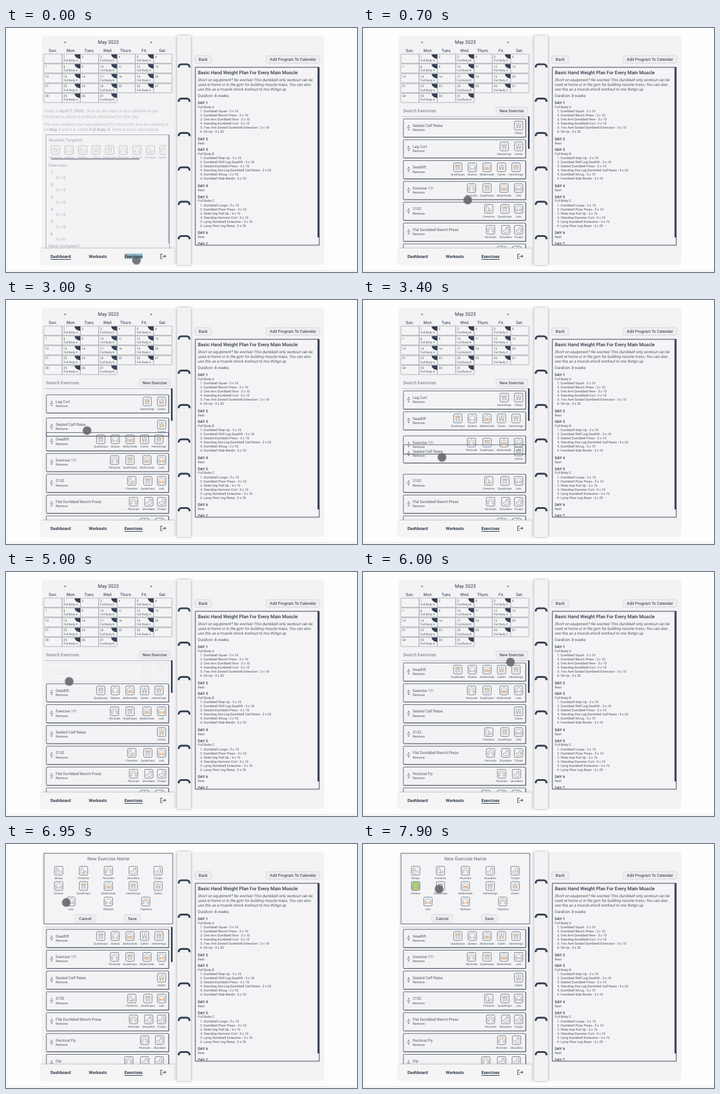
An HTML page that plays this animation: 600 by 417 pixels, repeating every 8000 ms.

```html
<!DOCTYPE html>
<html lang="en">
<head>
<meta charset="utf-8">
<title>Workout binder</title>
<style>
html, body { margin: 0; width: 100%; height: 100%; overflow: hidden; background: #fdfdfd; }
svg { display: block; font-family: Roboto, sans-serif; fill: #4c525c; text-rendering: geometricPrecision; }
.line { fill: none; stroke: #4a5463; }
.mid { text-anchor: middle; }
.med { font-weight: 500; }
.it { font-style: italic; }
.dark { fill: #2c3646; }
.soft { filter: drop-shadow(0 .7px 1px #0004); }
</style>
</head>
<body>
<svg id="stage" width="600" height="417" viewBox="0 0 600 417"></svg>
<script>
const LOOP = 8000, PITCH = 35.6;
const $ = id => document.getElementById(id);
const set = (id, attrs) => {
  for (const k in attrs) $(id).setAttribute(k, attrs[k]);
};
const range = (n, f) => Array.from({ length: n }, (_, i) => f(i)).join('');
const text = (x, y, s, size, cls = '', more = '') =>
  `<text x="${x}" y="${y}" font-size="${size}" class="${cls}" ${more}>${s}</text>`;
const rect = (x, y, w, h, more = '') =>
  `<rect x="${x}" y="${y}" width="${w}" height="${h}" ${more}/>`;
const path = (d, more = '') => `<path d="${d}" ${more}/>`;
const group = (id, body, more = '') => `<g id="${id}" ${more}>${body}</g>`;
const button = (x, y, w, label) =>
  rect(x, y, w, 11.5, 'rx="1.5" fill="#eeeef0" class="soft"') +
  text(x + w / 2, y + 8.2, label, 6.95, 'mid med');

// Muscle icons: a grey outline plus an orange highlight
const LEGS = 'M-3.6-5Q-4.4-2-3.2 0-3.8 2.5-2.8 5M-.6-5Q-.5-2-1.3 0-.9 2.5-1.5 5' +
  'M3.6-5Q4.4-2 3.2 0 3.8 2.5 2.8 5M.6-5Q.5-2 1.3 0 .9 2.5 1.5 5';
const TORSO = 'M-5 5V0Q-5-3.5-2-4L0-5 2-4Q5-3.5 5 0V5M-3 0V5M3 0V5';
const ARM = 'M-4-5Q-5.5 2-4 4.5H2Q5 4 4.5 1 2-1 0 1.5L-1-4Z';
const MUSCLES = {
  Biceps: [ARM, 'M-2.5-2V1.5'], Forearms: [ARM, 'M-2 3H2.5'],
  Shoulders: [ARM, 'M-2.5-4V-1.5', -1], Triceps: [ARM, 'M-3.5-1V2.5', -1],
  Pectorals: [TORSO, 'M-2.5-1H-.5M.5-1H2.5'], Abdominals: [TORSO, 'M-.9-1V4.5M.9-1V4.5'],
  Lats: [TORSO, 'M-2 0L-1.2 3.5M2 0L1.2 3.5'], Obliques: [TORSO, 'M-2.2 1V4M2.2 1V4'],
  Trapezius: [TORSO, 'M-2.5-2.5L0-.5 2.5-2.5'], Gluteus: [TORSO, 'M-2 3H-.4M.4 3H2'],
  Quadriceps: [LEGS, 'M-2.3-4V-1M2.3-4V-1'], Hamstrings: [LEGS, 'M-2.3-2.5V.5M2.3-2.5V.5'],
  Calves: [LEGS, 'M-2.3 .5V3M2.3 .5V3']
};
const icon = (x, y, name) => {
  const [shape, spot, flip = 1] = MUSCLES[name];
  return `<g transform="translate(${x} ${y})">` +
    rect(-7.2, -7.5, 14.4, 15, 'rx="2.2" class="line" stroke-width=".75"') +
    `<g transform="scale(${flip} 1)" fill="none">` +
    path(shape, 'stroke="#8b9199" stroke-width=".7"') +
    path(spot, 'stroke="#eca86a" stroke-width="1.4"') + '</g>' +
    text(0, 14.4, name, 4.85, 'mid it') + '</g>';
};

// Calendar
const colX = c => 65 + c * 31.3, rowY = r => 45 + r * 16.75;
const dayCell = day => {
  const c = day % 7, r = Math.floor(day / 7), x = colX(c), y = rowY(r);
  const plan = { 1: 'A', 3: 'B', 5: 'C' }[c];
  return rect(x, y, 30.8, 15, 'fill="#f4f4f6" stroke="#a3a7ad" stroke-width=".5" class="soft"') +
    (day ? text(x + 2, y + 6, day, 5.2) : '') +
    (plan ? path(`M${x + 21} ${y}H${x + 30.8}V${y + 7.6}A9.8 7.6 0 0 1 ${x + 21} ${y}Z`, 'fill="#354054"') +
      text(x + 2.2, y + 12.3, 'Full Body ' + plan, 4.9) : '');
};
const calendar =
  text(101, 26.5, '&lt;', 8, 'mid dark') + text(175, 27, 'May 2023', 8.2, 'mid dark') +
  text(248, 26.5, '&gt;', 8, 'mid dark') +
  ['Sun.', 'Mon.', 'Tues.', 'Wed.', 'Thurs.', 'Fri.', 'Sat.']
    .map((d, i) => text(80 + i * 31.3, 41, d, 7.2, 'mid dark')).join('') +
  range(32, dayCell);

// Dashboard page
const bold = s => `<tspan font-weight="600">${s}</tspan>`;
const dashboard =
  `<g opacity=".75">` +
  text(64, 144, `Today is ${bold('April 3, 2020')}. Click on any date on the calendar to get`, 7.12) +
  text(64, 153.5, 'information about a workout scheduled for that day.', 7.12) +
  text(64, 166.5, 'The next workout you have planned for the month you are viewing is', 7.12) +
  text(64, 176, `on ${bold('May 1')} and it is called ${bold('Full Body A')}. Here is more information.`, 7.12) +
  '</g>' + rect(68.5, 182.5, 211, 200, 'class="line"') + rect(277.5, 183, 2.5, 185, 'fill="#354054"') +
  text(73, 194, 'Muscles Targeted', 7.3) +
  '<svg x="73" y="198" width="201" height="25">' +
  ['Hamstrings', 'Gluteus', 'Biceps', 'Calves', 'Quadriceps', 'Pectorals', 'Obliques', 'Forearms', 'Trapezius']
    .map((m, i) => icon(11.5 + i * 23.2, 10.5, m)).join('') + '</svg>' +
  rect(77, 222.5, 151, 2.6, 'fill="#354054"') +
  text(73, 236.5, 'Exercises', 7.3) +
  range(6, i => text(76, 249 + i * 21, i + 1 + '.', 6.5, 'med') +
    text(85, 258 + i * 21, i < 5 ? '3 x 10' : '3 x 20', 6.3)) +
  text(73, 375, 'Mark Complete?', 7.3);

// Exercise list
const EXERCISES = [
  ['Seated Calf Raise', 'Calves 266'],
  ['Leg Curl', 'Hamstrings 241.5 Calves 266'],
  ['Deadlift', 'Quadriceps 162 Gluteus 186.8 Abdominals 212 Calves 236.8 Hamstrings 261.5'],
  ['Exercise 11!', 'Pectorals 185.5 Quadriceps 212 Abdominals 241 Lats 266'],
  ['2132', 'Forearms 215 Quadriceps 242.5 Lats 266'],
  ['Flat Dumbbell Bench Press', 'Pectorals 218 Shoulders 244 Triceps 266'],
  ['Pectoral Fly', 'Pectorals 237 Shoulders 262.5'],
  ['Dip', 'Pectorals 210 Shoulders 237 Triceps 262']
];
const card = ([name, muscles], i) => group('card' + i,
  rect(69, 1.1, 209, 31, 'rx="1" class="line" stroke-width=".9"') +
  path('M69.5 32.6H278.5V1.6', 'class="line" stroke-width="1.1" opacity=".65"') +
  path('M75.3 16H80.7M78 12V14.3M78 17.7V20M76.7 13.3L78 12 79.3 13.3M76.7 18.7L78 20 79.3 18.7', 'class="line" stroke-width=".8"') +
  text(85, 14.8, name, 6.55) + text(85, 22, 'Remove', 5.7) +
  muscles.replace(/(\w+) ([\d.]+)/g, (_, m, x) => icon(+x, 12.5, m)));
const exercises =
  group('search', text(68.5, 144, 'Search Exercises', 7.5, '', 'opacity=".8"') + button(228, 135.7, 52.5, 'New Exercise')) +
  `<svg id="list" x="0" width="290">${path('M66 .5H285', 'stroke="#9aa0a8" stroke-width=".7"')}` +
  EXERCISES.map(card).join('') + rect(282, 0, 2.8, 50, 'id="bar" fill="#354054"') + '</svg>';

// New exercise form
const iconRow = (x, dx, y, names) => names.split(' ').map((m, i) => icon(x + i * dx, y, m)).join('');
const form =
  rect(65, 128, 220, 120.5, 'fill="#f4f4f6" stroke="#4a5463" stroke-width=".9"') +
  text(175, 140.3, 'New Exercise Name', 8.15, 'mid', 'opacity=".85"') +
  rect(82.8, 176.2, 14.4, 15, 'id="picked" rx="2.2" fill="#b2d681"') +
  iconRow(90, 42.5, 157.7, 'Biceps Forearms Pectorals Shoulders Triceps') +
  iconRow(90, 42.5, 183.7, 'Gluteus Quadriceps Abdominals Hamstrings Calves') +
  iconRow(111, 64, 210.3, 'Lats Obliques Trapezius') +
  button(118, 233.3, 35, 'Cancel') + button(203, 233.3, 26, 'Save');

// Navigation
const nav =
  path('M61 377H288V405H66Q61 405 61 400Z', 'fill="#f5f5f6" style="filter:drop-shadow(0 -1px 1.5px #0003)"') +
  rect(203, 385.5, 30.5, 9, 'id="mark" fill="#8fb7c9"') +
  [['Dashboard', 93.3], ['Workouts', 157], ['Exercises', 218]]
    .map(([s, x]) => text(x, 392.6, s, 7.2, 'mid dark', 'font-weight="600"')).join('') +
  rect(76, 395, 35, 1, 'id="under" class="dark"') +
  path('M268 386.5H264.5V394H268M267 390.2H273M270.8 388L273 390.2 270.8 392.4', 'class="line" stroke-width="1.1"');

// Binder spine
const spine =
  rect(292.5, 13, 23.5, 392, 'rx="1.5" fill="#f2f2f4" style="filter:drop-shadow(0 0 2px #0005)"') +
  range(6, i => `<g transform="translate(0 ${62 + i * 58.7})">` +
    path('M295 5.5Q295.5 0 300 0H309Q313.5 0 314 5.5', 'fill="none" stroke="#354054" stroke-width="3.2"') + '</g>');

// Program page
const PROGRAM = [
  ['Full Body A', 'Dumbbell Squat - 3 x 10', 'Dumbbell Bench Press - 3 x 10', 'One Arm Dumbbell Row - 3 x 10',
    'Standing Dumbbell Curl - 3 x 10', 'Two Arm Seated Dumbbell Extension - 3 x 10', 'Sit Up - 3 x 20'],
  ['Rest'],
  ['Full Body B', 'Dumbbell Step Up - 3 x 10', 'Dumbbell Stiff Leg Deadlift - 3 x 10', 'Seated Dumbbell Press - 3 x 10',
    'Standing One Leg Dumbbell Calf Raise - 3 x 20', 'Dumbbell Shrug - 3 x 10', 'Dumbbell Side Bends - 3 x 10'],
  ['Rest'],
  ['Full Body C', 'Dumbbell Lunge - 3 x 10', 'Dumbbell Floor Press - 3 x 10', 'Wide Grip Pull Up - 3 x 10',
    'Standing Hammer Curl - 3 x 10', 'Lying Dumbbell Extension - 3 x 10', 'Lying Floor Leg Raise - 3 x 20'],
  ['Rest'], []
];
let dayY = 130.3;
const days = PROGRAM.map(([kind, ...moves], i) => {
  const y = dayY;
  dayY += moves.length ? 61.3 : 18.8;
  return text(328, y, 'DAY ' + (i + 1), 6.4, 'med dark') + (kind ? text(328, y + 6.9, kind, 5.65) : '') +
    moves.map((m, j) => text(332, y + 14 + j * 7, `${j + 1}. ${m}`, 5.64)).join('');
}).join('');
const program =
  button(323.5, 48, 27, 'Back') + button(445.5, 48, 90, 'Add Program To Calendar') +
  rect(323.8, 67.3, 211.5, 303.7, 'fill="#f4f4f6" stroke="#4a5463" class="soft"') +
  rect(532.5, 67, 3, 291, 'fill="#354054"') +
  text(328, 79.3, 'Basic Hand Weight Plan For Every Main Muscle', 8.1, 'med dark') +
  ['Short on equipment? No worries! This dumbbell only workout can be',
    'used at home or in the gym for building muscle mass. You can also',
    'use this as a muscle shock workout to mix things up.']
    .map((s, i) => text(328, 91.3 + i * 7.9, s, 6.69, 'it')).join('') +
  text(328, 118, 'Duration: 8 weeks', 6.7) +
  `<svg width="600" height="370">${days}</svg>`;

$('stage').innerHTML =
  rect(0, 0, 600, 417, 'fill="#fdfdfd"') + rect(0, 414.5, 600, 1, 'fill="#dedede"') +
  rect(2, 0, .7, 414, 'fill="#ececec"') +
  rect(61, 13.5, 483, 391.5, 'rx="5" fill="#f3f3f5"') +
  group('calendar', calendar) + group('dashboard', dashboard) +
  group('exercises', exercises) + group('form', form) + nav + program + spine +
  group('cursor', '<circle r="8" fill="#55565c" opacity=".3"/><circle r="7" fill="#606168" opacity=".8"/>');

// Motion
const clamp = v => Math.min(1, Math.max(0, v));
const ramp = (t, start, length) => clamp((t - start) / length);
const slide = (t, start) => 1 - (1 - ramp(t, start, 300)) ** 2;
const PATH = [
  [0, 223, 397], [150, 222, 393], [700, 179, 294], [1000, 177, 285], [1700, 158, 205], [2350, 142, 177],
  [2600, 142, 177], [3400, 135, 269], [3650, 134, 283], [4150, 134, 283], [4650, 98, 176], [4800, 98, 177],
  [5000, 108, 187], [5750, 252, 156], [6000, 252, 154], [6180, 254, 142], [6300, 252, 142],
  [6700, 109, 112], [7350, 91, 76], [7650, 92, 76], [7850, 130, 77], [8000, 130, 77]
];
const cursorAt = t => {
  const i = Math.max(1, PATH.findIndex(p => p[0] > t));
  const [a, b] = [PATH[i - 1], PATH[i]];
  let k = (t - a[0]) / (b[0] - a[0]);
  k = k * k * (3 - 2 * k);
  return [a[1] + (b[1] - a[1]) * k, a[2] + (b[2] - a[2]) * k];
};

const DROP = 3700, REMOVED = 5050, OPEN = 6300, RAISE = 6850;
const PASSED = { 1: 2830, 2: 3040, 3: 3220 };

function slotOf(i, t) {
  const gone = i === 1 ? 0 : slide(t, REMOVED);
  if (i) return i - (PASSED[i] ? slide(t, PASSED[i]) : 0) - gone;
  const pulled = t < 2600 ? 0 : (cursorAt(Math.min(t, DROP))[1] - 177) / PITCH;
  return pulled + (3 - pulled) * slide(t, DROP) - gone;
}

function draw(t) {
  const [x, y] = cursorAt(t), open = t >= OPEN, raised = t >= RAISE;
  set('cursor', { transform: `translate(${x} ${y})` });
  set('dashboard', { opacity: .45 * (1 - ramp(t, 0, 180)) });
  set('exercises', { opacity: ramp(t, 200, 300) });
  set('mark', { opacity: t < 100 ? 1 : 0 });
  set('under', t < 50 ? { x: 76, width: 35 } : { x: 202.5, width: 31 });
  set('calendar', { opacity: 1 - ramp(t, OPEN, 530) });
  set('search', { opacity: open ? 0 : 1 });
  set('form', { opacity: ramp(t, OPEN, 200), transform: `translate(0 ${raised ? -112 : 0})` });
  set('picked', { opacity: t > 7450 ? 1 : 0 });

  const top = raised ? 141.5 : open ? 253.5 : 151, view = 376 - top;
  set('list', { y: top, height: view });
  set('bar', { height: view * view / 912 });
  EXERCISES.forEach((_, i) => set('card' + i, { transform: `translate(0 ${3.3 + slotOf(i, t) * PITCH})` }));
  set('card1', { opacity: 1 - ramp(t, 4780, 240) });
}

function tick() {
  draw(performance.now() % LOOP);
  requestAnimationFrame(tick);
}
tick();
</script>
</body>
</html>
```
